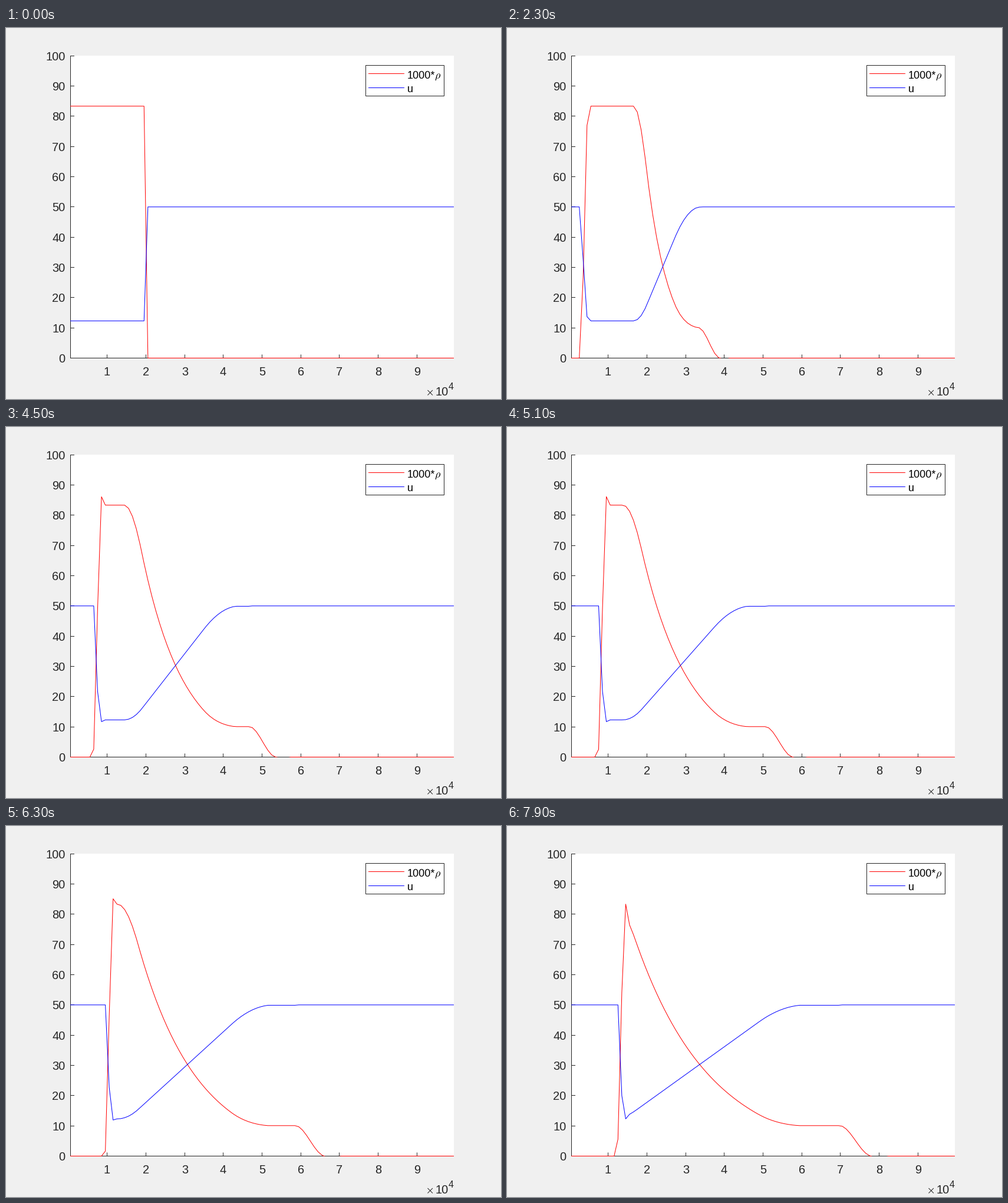
These frames come from a looping animation (840 px wide and 630 px high, 8 s). A matplotlib script:

```python
import numpy as np
import matplotlib.pyplot as plt
from matplotlib.animation import FuncAnimation
from matplotlib.patches import Rectangle

W, H, DPI = 840, 630, 100
PX = 72 / DPI
DARK = "#262626"
X0, X1, Y0, YS = 109.5, 759.5, 560.5, 5.134
STEP_MS, FRAMES = 100, 80
HOLD, RUSH = 4, 9          # frames at rest, frames of fast start

# traffic model: u + C ln(rho) is constant through the fan
RHO_JAM, RHO_FREE = 83.33, 10.0
U_JAM, U_FREE = 12.3, 50.0
C = (U_FREE - U_JAM) / np.log(RHO_JAM / RHO_FREE)
CELLS = 500 + 1000 * np.arange(100)
START = 20000

plt.rcParams["font.family"] = "Liberation Sans"
plt.rcParams["mathtext.fontset"] = "cm"


def px(x):
    return X0 + (x - 500) * (X1 - X0) / 99000


def py(v):
    return Y0 - YS * v


def pixel(c):
    return np.floor(c) + 0.5


def clock(i):
    """Simulated seconds at frame i."""
    k = i - HOLD - RUSH
    if k < 0:
        return max(1, 204 * (1 + k / RUSH))
    return 204 + 11.9 * k + 0.0212 * k * k


def soft_ramp(d, h):
    """max(d, 0) with its corner rounded over -h..h."""
    return np.where(d > h, d, np.clip(d + h, 0, None) ** 2 / (4 * h))


def smoothstep(x, a, b):
    s = np.clip((x - a) / (b - a), 0, 1)
    return s * s * (3 - 2 * s)


def state(t):
    x = CELLS
    root = np.sqrt(t)
    fan = C + (x - START) / (1.006 * t)
    u = U_JAM + soft_ramp(fan - U_JAM, 92 * root / t)
    u = u - soft_ramp(fan - U_FREE, 185 * root / t)
    rho = RHO_FREE * np.exp((U_FREE - np.clip(u, U_JAM, U_FREE - 0.12)) / C)

    # leading contact, smeared as t^(1/3), with a slight dip ahead of it
    half = 405 * np.cbrt(t)
    lead = START + U_FREE * t - 150
    rho = rho * (1 - smoothstep(x, lead - half, lead + half))
    gap = (x - lead) / half
    rho = np.where((gap > 1) & (gap < 1.9), -0.3 * min(t / 200, 1), rho)

    # rear shock; the first cell past it keeps the jam density or overshoots
    d = x - U_JAM * t + 900 * np.exp(-t / 200)
    rho = rho * smoothstep(d, -1150, 1050)
    fade = np.clip((t - 200) / 100, 0, 1) * np.clip((1000 - t) / 300, 0, 1)
    peak = 1 + 0.06 * fade * np.clip(1 - abs(d - 950) / 300, 0, 1)
    rho = np.where((d > 800) & (d <= 1800), RHO_JAM * peak, rho)

    u = U_FREE - C * np.log(np.maximum(rho, RHO_FREE) / RHO_FREE)
    return rho, u


fig = plt.figure(figsize=(W / DPI, H / DPI), dpi=DPI, facecolor="#f0f0f0")
ax = fig.add_axes([0, 0, 1, 1])
ax.set_xlim(0, W)
ax.set_ylim(H, 0)
ax.axis("off")


def seg(xa, ya, xb, yb, color=DARK, z=2):
    ax.plot([xa, xb], [ya, yb], color=color, lw=PX, zorder=z,
            solid_capstyle="butt", snap=False)


def label(x, y, s, size=20, ha="left", color=DARK):
    ax.text(x, y, s, fontsize=size * PX, ha=ha, va="baseline",
            color=color, zorder=6)


ax.add_patch(Rectangle((109, 47), 651, 514, fc="white", ec="none", zorder=1))
seg(X0, 47, X0, 561)
seg(109, Y0, 760, Y0)
for v in range(0, 101, 10):
    y = pixel(py(v))
    seg(110, y, 116, y)
    label(100.5, y + 7.3, str(v), ha="right")
for k in range(1, 10):
    x = pixel(px(k * 1e4))
    seg(x, 554.5, x, 560)
    label(x, 590, str(k), ha="center")

seg(715.5, 615, 724, 623.5)
seg(715.5, 623.5, 724, 615)
label(728, 624.5, "10")
label(750.5, 614.5, "4", 16)

ax.add_patch(Rectangle((610.5, 63.5), 133, 52, fc="white", ec=DARK,
                       lw=PX, zorder=5, snap=False))
seg(615, 77.5, 676, 77.5, "red", 6)
seg(615, 101.5, 676, 101.5, "blue", 6)
label(680.5, 86, "1000*", 18, color="black")
label(727, 86, r"$\rho$", 18, color="black")
label(680.5, 109, "u", 18, color="black")

clip = Rectangle((109, 47), 651, 514, transform=ax.transData)
curves = []
for color in ("red", "blue"):
    line, = ax.plot([], [], color=color, lw=PX, zorder=4, snap=False,
                    solid_joinstyle="round")
    line.set_clip_path(clip)
    curves.append(line)


def draw(i):
    for line, values in zip(curves, state(clock(i))):
        line.set_data(px(CELLS), py(values))
    return curves


anim = FuncAnimation(fig, draw, frames=FRAMES, interval=STEP_MS,
                     repeat=True, repeat_delay=0, blit=False)
plt.show()
```
